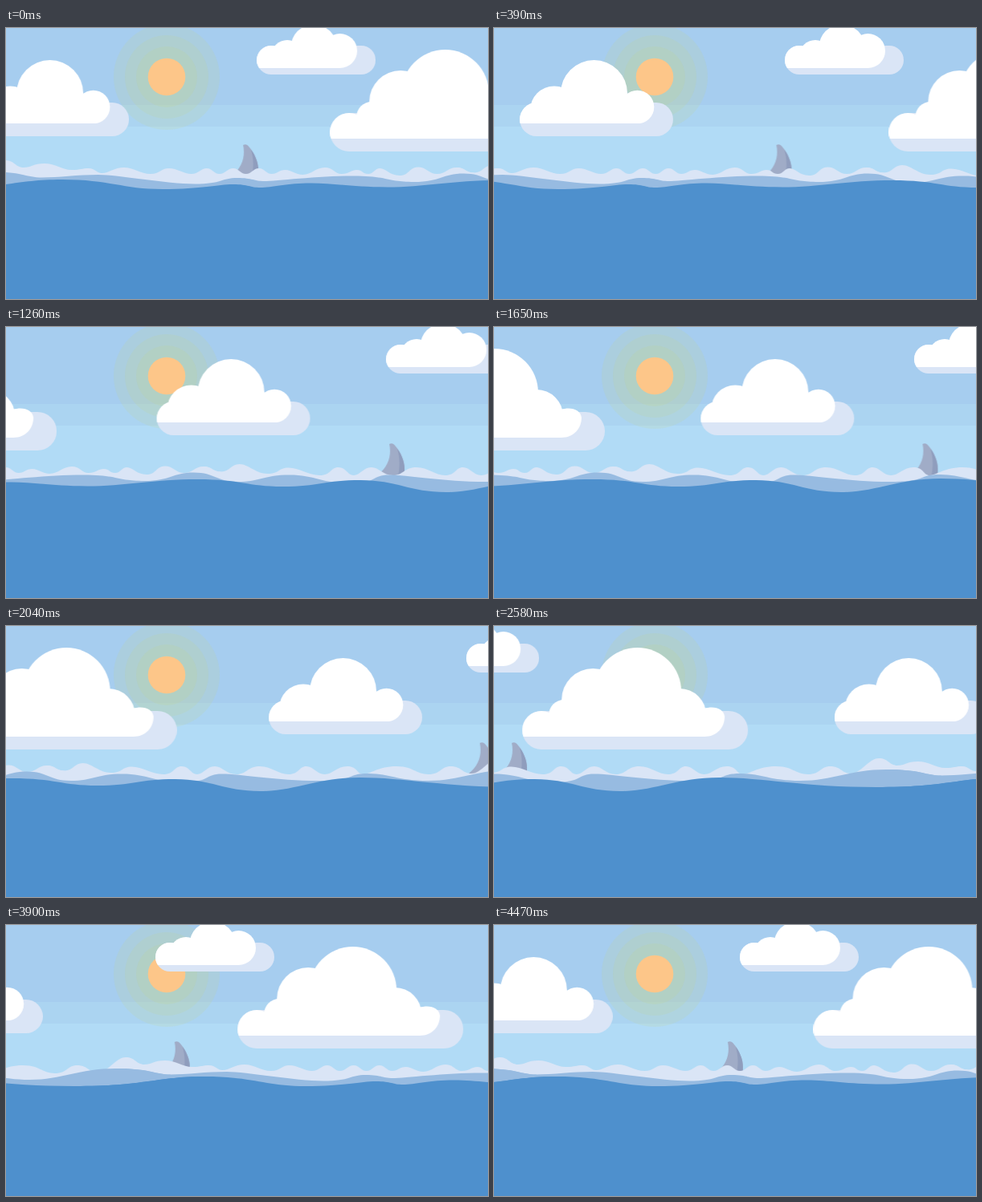
These frames come from a looping animation (600 px wide and 338 px high, 4500 ms). An HTML page without scripts:

```html
<!DOCTYPE html>
<html lang="en">
<head>
<meta charset="utf-8">
<title>Shark fin at sea</title>
<style>
  html, body { margin: 0; width: 100%; height: 100%; overflow: hidden; }
  svg { display: block; width: 100vw; height: 100vh; }

  .move { animation: 4500ms linear infinite; }
  .fin { animation-name: fin; }
  .cloud-mid { animation-name: cloud-mid; }
  .cloud-small { animation-name: cloud-small; }
  .cloud-large { animation-name: cloud-large; }
  .wave { animation-name: wave; }

  .white { fill: #fff; }
  .pale { fill: #dae5f6; }

  /* Everything drifting right leaves the stage, then re-enters from the left. */
  @keyframes fin {
    0% { transform: translateX(295px); }
    50% { transform: translateX(620px); }
    50.001% { transform: translateX(-25px); }
    100% { transform: translateX(295px); }
  }
  @keyframes cloud-mid {
    0% { transform: translateX(-38px); }
    80% { transform: translateX(606px); }
    80.001% { transform: translateX(-199px); }
    100% { transform: translateX(-38px); }
  }
  @keyframes cloud-small {
    0% { transform: translateX(312px); }
    50% { transform: translateX(599.6px); }
    50.001% { transform: translateX(-161.5px); }
    100% { transform: translateX(312px); }
  }
  @keyframes cloud-large {
    0% { transform: translateX(403px); }
    20% { transform: translateX(606.5px); }
    20.001% { transform: translateX(-287px); }
    100% { transform: translateX(403px); }
  }
  /* Each wave slides left by one tile. */
  @keyframes wave {
    to { transform: translateX(calc(-1 * var(--tile))); }
  }
</style>
</head>
<body>
<svg viewBox="0 0 600 338" preserveAspectRatio="none">
  <defs>
    <clipPath id="above-mid"><rect y="-20" width="300" height="139"/></clipPath>
    <clipPath id="above-small"><rect y="-20" width="300" height="70"/></clipPath>
    <clipPath id="above-large"><rect y="-20" width="300" height="158"/></clipPath>

    <g id="foam">
      <path d="M-1 165C11 165 12 174 22 174S34 169 48 169S70 177 82 177S94 175 103 175S112 181 120 181S135 174 147 174
        S168 182 180 182S193 175 203 175S222 182 231 182S243 175 250 175S259 182 266 182S276 175 283 175
        S292 182 299 182S308 175 315 175S324 182 331 182S340 177 348 177S360 183 370 183S386 174 397 174
        S409 182 418 182S430 177 437 177S444 182 451 182S459 175 466 175S478 184 490 184S502 173.5 513 173.5
        S526 182 537 182S550 174 561 174S572 180.5 583 180.5V210H-1z"/>
      <path d="M561 174C572 174 572 180.5 583 180.5S595 171 606 171S626 183 641 183S654 175.5 667 175.5S692 185 706 185
        S719 175 729 175S740 185 748 185S760 175 770 175S784 185 797 185S811 175 826 175S849 185 862 185
        S875 175 884 175S897 185 907 185S922 175 935 175S947 185 955 185S974 175 996 175S1020 185 1036 185
        S1051 175 1064 175S1078 184 1090 184S1112 165 1124 165S1137 174 1147 174V210H561z"/>
    </g>
    <path id="swell" d="M-24 179C21 179 25 186.5 45 186.5S90 183 115 183S200 194.5 235 194.5S268 187 288 187S308 191 322 191
      S387 184.5 432 184.5S474 192 508 192S543 181.5 570 181.5S597 193 625 193S657 184.5 689 184.5S729 195 764 195
      S791 184.5 813 184.5S882 193 932 193S967 184 995 184S1030 193 1070 193S1131 179 1176 179S1225 186.5 1245 186.5V210H-24z"/>
    <path id="sea" d="M-93 201C-3 201 10 189 70 189S145 201 195 201S263 195 283 195S303 199 317 199S350 193.5 380 193.5
      S430 198.5 475 198.5S557 190 612 190S673 199 718 199S770 191 815 191S876 206 921 206S990 189 1045 189
      S1150 201 1240 201S1343 189 1403 189V340H-93z"/>
  </defs>

  <!-- sky -->
  <rect width="600" height="338" fill="#b1dbf6"/>
  <rect width="600" height="123" fill="#abd4f1"/>
  <rect width="600" height="96" fill="#a6cdef"/>

  <!-- sun -->
  <g transform="translate(200 61)">
    <g fill="#c5d07a" fill-opacity=".14">
      <circle r="66"/>
      <circle r="52"/>
      <circle r="38"/>
    </g>
    <circle r="23.3" fill="#fdc689"/>
  </g>

  <!-- clouds -->
  <g class="move cloud-mid">
    <rect class="pale" y="93" width="191" height="42" rx="21"/>
    <g class="white" clip-path="url(#above-mid)">
      <circle cx="21" cy="114" r="21"/>
      <circle cx="43" cy="102.5" r="30"/>
      <circle cx="92.5" cy="81.5" r="41.5"/>
      <circle cx="146.5" cy="98.5" r="20.8"/>
      <rect x="21" y="95" width="126" height="24"/>
    </g>
  </g>
  <g class="move cloud-small">
    <rect class="pale" y="22" width="148" height="36" rx="18"/>
    <g class="white" clip-path="url(#above-small)">
      <circle cx="18" cy="40" r="18"/>
      <circle cx="38" cy="35" r="20"/>
      <circle cx="71" cy="24" r="28.5"/>
      <circle cx="103.5" cy="28.5" r="21.5"/>
      <rect x="18" y="28" width="86" height="22"/>
    </g>
  </g>
  <g class="move cloud-large">
    <rect class="pale" y="106" width="281" height="48" rx="24"/>
    <g class="white" clip-path="url(#above-large)">
      <circle cx="24" cy="130" r="24"/>
      <circle cx="52" cy="111" r="19"/>
      <circle cx="88" cy="92" r="39"/>
      <circle cx="143.5" cy="81.5" r="54.5"/>
      <circle cx="196" cy="111" r="33"/>
      <rect x="24" y="112" width="200" height="26"/>
      <path d="M200 138H227C242 138 252 127 252 113C251 103 239 99 226 103L200 110z"/>
    </g>
  </g>

  <!-- fin -->
  <g class="move fin">
    <path fill="#a0acc7" d="M0 146C3 144 6 146 8 149C14 156 19 167 19 177V190H-14V184C-1 174 3 160 0 146z"/>
    <path fill="#8f9dbd" d="M10 152C14 157 19 167 19 177V190H10C14 175 13 162 10 152z"/>
  </g>

  <!-- water -->
  <g class="move wave pale" style="--tile: 1125px">
    <use href="#foam"/><use href="#foam" x="1125"/>
  </g>
  <g class="move wave" style="--tile: 1200px" fill="#97bbe1">
    <use href="#swell"/><use href="#swell" x="1200"/>
  </g>
  <g class="move wave" style="--tile: 1333px" fill="#4e90cd">
    <use href="#sea"/><use href="#sea" x="1333"/>
  </g>
</svg>
</body>
</html>
```
